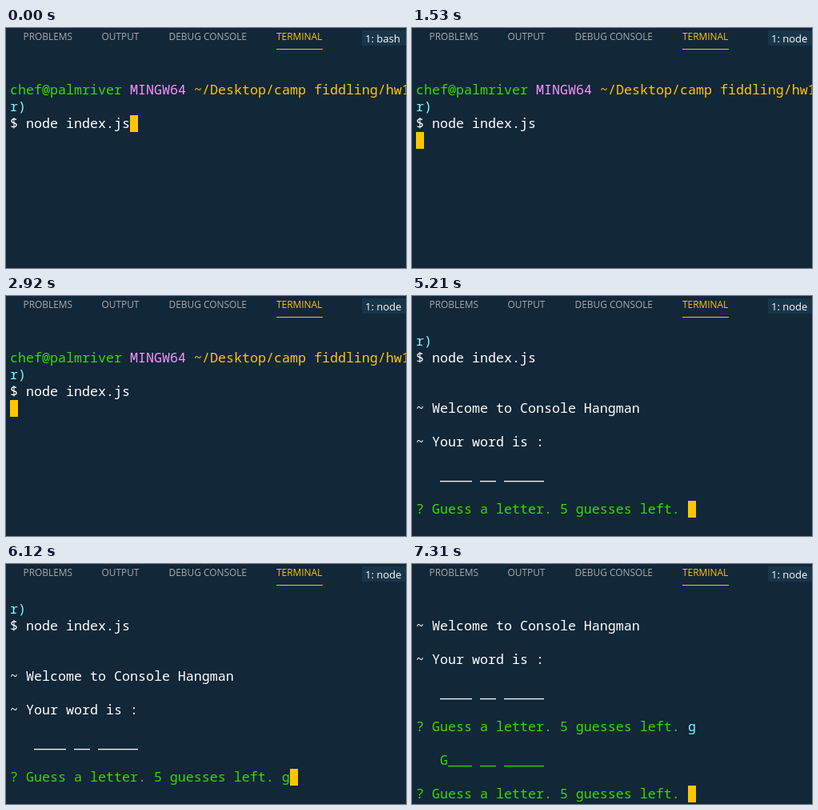
Write an HTML page that moves like this. It is 500x300 px and loops after 8 s.

```html
<!DOCTYPE html>
<html lang="en">
<head>
<meta charset="utf-8">
<title>Hangman in the terminal</title>
<style>
  html, body { margin: 0; width: 100%; height: 100%; overflow: hidden; background: #122738; }
  svg { display: block; }
  text { white-space: pre; }
  #tabs, #shell { font-family: "Open Sans", "Noto Sans", sans-serif; }
  #tabs { font-size: 11.9px; fill: #aaa; }
  #shell { font-size: 13px; fill: #fff; }
  #screen { font: 16.667px "Noto Sans Mono", "DejaVu Sans Mono", monospace; }
</style>
</head>
<body>
<svg width="500" height="300" viewBox="0 0 500 300">
  <rect width="500" height="300" fill="#122738"/>
  <g id="tabs">
    <text x="21.5" y="15">PROBLEMS</text>
    <text x="119.5" y="15">OUTPUT</text>
    <text x="203.5" y="15">DEBUG CONSOLE</text>
    <text x="338" y="15" fill="#ffc600">TERMINAL</text>
  </g>
  <rect x="338" y="26" width="58" height="1" fill="#ffc600"/>
  <rect x="445" y="3" width="55" height="19" fill="#193549"/>
  <text id="shell" x="449" y="18"></text>
  <g id="screen"></g>
  <rect id="cursor" width="10" height="21" fill="#ffc600"/>
</svg>
<script>
const LOOP = 8000, LEFT = 5, TOP = 46, CELL = 10, ROW = 21;
const white = '#fff', green = '#3ad900', pink = '#fb94ff', gold = '#ffc600', cyan = '#80fcff';
const $ = id => document.getElementById(id);

// A line is a list of [text, colour] runs; an empty list is a blank row.
const line = (text, colour = white) => [[text, colour]];
const blank = [];
const prompt = [['chef@palmriver ', green], ['MINGW64 ', pink], ['~/Desktop/camp fiddling/hw1', gold]];
const command = [line('r)', cyan), line('$ node index.js')];
const guess = '? Guess a letter. 5 guesses left. ';
const blanks = '   ____ __ _____';
const welcome = [
  line('~ Welcome to Console Hangman'), blank,
  line('~ Your word is :'), blank,
  line(blanks), blank
];

const start = [blank, prompt, ...command];
const game = [...command, blank, blank, ...welcome];
const answered = [
  blank, ...welcome,
  [[guess, green], ['g', cyan]], blank,
  line(blanks.replace('_', 'G'), green), blank,
  line(guess, green)
];

// The cursor follows the last line.
const states = [
  { at: 0, shell: 'bash', lines: start },
  { at: 1380, shell: 'bash', lines: [...start, blank] },
  { at: 1530, shell: 'node', lines: [...start, blank] },
  { at: 3840, shell: 'node', lines: [...game, line(guess, green)] },
  { at: 6120, shell: 'node', lines: [...game, line(guess + 'g', green)] },
  { at: 6270, shell: 'node', lines: answered }
];

function show({ shell, lines }) {
  $('shell').textContent = '1: ' + shell;
  $('screen').replaceChildren();
  let column = 0;
  lines.forEach((runs, row) => {
    column = 0;
    for (const [text, colour] of runs) {
      const el = document.createElementNS('http://www.w3.org/2000/svg', 'text');
      el.setAttribute('x', LEFT + column * CELL);
      el.setAttribute('y', TOP + row * ROW + 16);
      el.setAttribute('fill', colour);
      el.textContent = text;
      $('screen').append(el);
      column += text.length;
    }
  });
  $('cursor').setAttribute('x', LEFT + column * CELL);
  $('cursor').setAttribute('y', TOP + (lines.length - 1) * ROW);
}

const began = performance.now();
let current;
function tick() {
  const time = (performance.now() - began) % LOOP;
  const next = states.findLast(state => state.at <= time);
  if (next !== current) show(current = next);
  requestAnimationFrame(tick);
}
tick();
</script>
</body>
</html>
```
